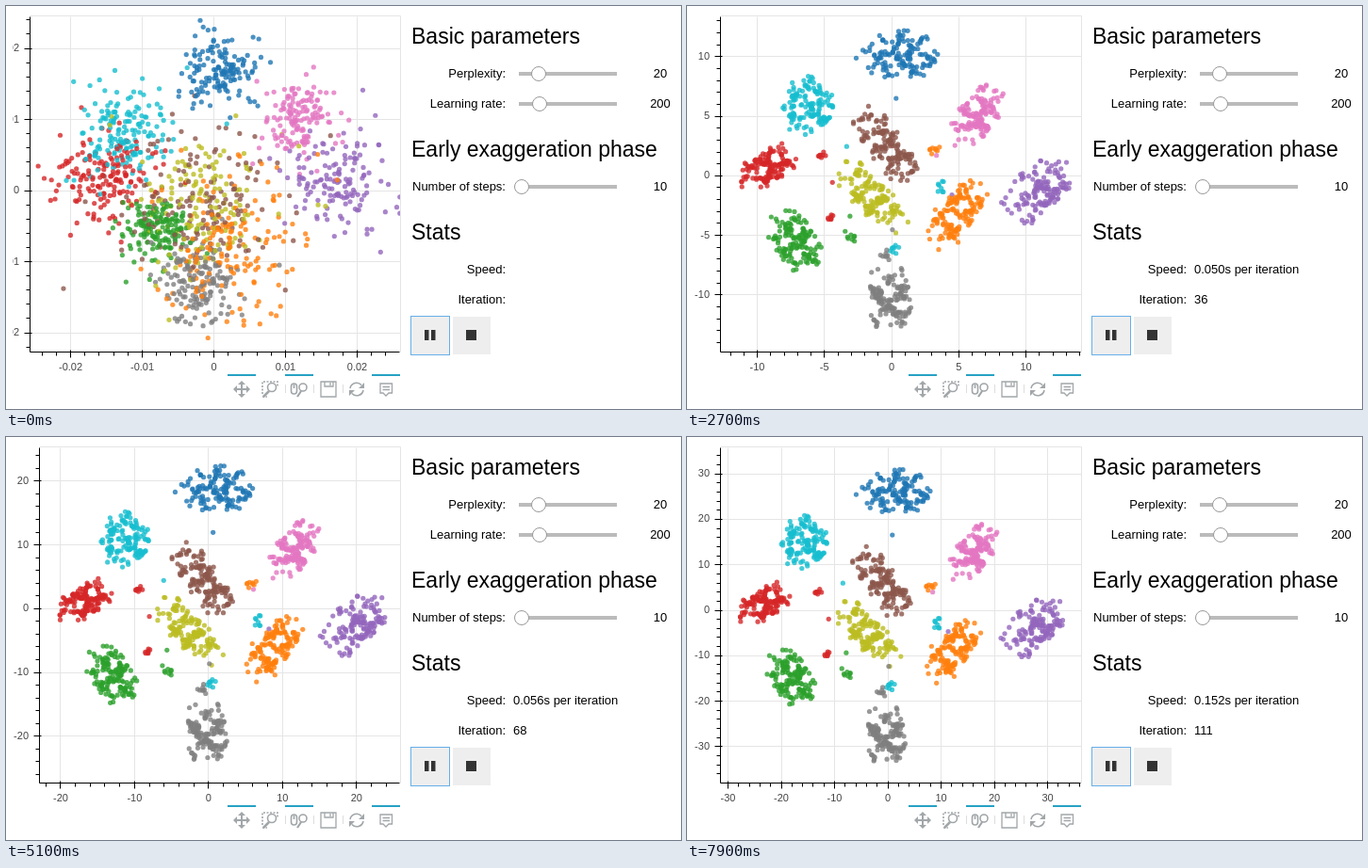
Recreate the animation shown at these times as an HTML page with a canvas. Size 716 px wide and 428 px high, loop 8 s.

```html
<!DOCTYPE html>
<html lang="en">
<head>
<meta charset="utf-8">
<title>t-SNE embedding</title>
<style>
html, body { margin: 0; width: 716px; height: 428px; overflow: hidden; background: #fff; }
canvas, svg { position: absolute; left: 0; top: 0; }
text { font: 13px "Liberation Sans", Arial, sans-serif; fill: #000; }
.head { font-size: 23px; }
.end { text-anchor: end; }
.mid { text-anchor: middle; }
.icon { fill: none; stroke: #a1a6a9; stroke-width: 1.6; }
.icon .solid { fill: #a1a6a9; stroke: none; }
</style>
</head>
<body>
<canvas id="plot" width="716" height="428"></canvas>
<svg width="716" height="428">
  <text class="head" x="430" y="40">Basic parameters</text>
  <text class="head" x="430" y="160">Early exaggeration phase</text>
  <text class="head" x="430" y="248">Stats</text>
  <g class="end">
    <text x="530" y="76">Perplexity:</text>
    <text x="530" y="108">Learning rate:</text>
    <text x="530" y="196">Number of steps:</text>
    <text x="530" y="284">Speed:</text>
    <text x="530" y="316">Iteration:</text>
  </g>
  <g class="mid">
    <text x="694" y="76">20</text>
    <text x="694" y="108">200</text>
    <text x="694" y="196">10</text>
  </g>
  <text id="speed" x="538" y="284"></text>
  <text id="iter" x="538" y="316"></text>
  <path d="M544 72H648M544 104H648M544 192H648" stroke="#bbb" stroke-width="4"/>
  <g fill="#fff" stroke="#999">
    <circle cx="565" cy="72" r="7.5"/><circle cx="566" cy="104" r="7.5"/><circle cx="547" cy="192" r="7.5"/>
  </g>
  <rect x="429.5" y="329.5" width="41" height="41" fill="#eee" stroke="#66afe9"/>
  <rect x="474" y="330" width="40" height="40" fill="#eee"/>
  <path d="M444 344h4.5v11h-4.5zM451 344h4.5v11h-4.5zM488 344h11v11h-11z" fill="#333"/>

  <path d="M235 392H265M296 392H326M388 392H418" stroke="#26a2c4" stroke-width="2"/>
  <path d="M296.5 402v9M326.5 402v9M357.5 402v9" stroke="#ddd"/>
  <g class="icon">
    <path d="M243 407H257M250 400V414" stroke-width="2"/>
    <path class="solid" d="M241 407l4-4v8zM259 407l-4-4v8zM250 398l-4 4h8zM250 416l-4-4h8z"/>
    <path d="M272 412V399H288V404M272 415H277" stroke-dasharray="2 1.5"/>
    <circle cx="282" cy="405" r="4.5"/><path d="M279 409L273 415" stroke-width="2.5"/>
    <rect x="302.5" y="401" width="6" height="11" rx="3"/><path d="M305.5 402v4"/>
    <circle cx="315" cy="405" r="4"/><path d="M313 409L309 415" stroke-width="2.2"/>
    <path d="M334 399H350V415H334zM338 399V404H347V399M344 400v3" stroke-width="1.3"/>
    <path d="M365 406A7 7 0 0 1 377 402.5M379 408A7 7 0 0 1 367 411.5"/>
    <path class="solid" d="M380 400v6h-6zM364 414v-6h6z"/>
    <path d="M397 401H409.5V411H406L403 414L400 411H397zM399.5 404.5H407M399.5 407.5H407" stroke-width="1.3"/>
  </g>
</svg>
<script>
const ctx = document.getElementById('plot').getContext('2d');
const speedText = document.getElementById('speed'), iterText = document.getElementById('iter');
const TOP = 11, RIGHT = 418, BOTTOM = 367;

let seed = 7;
function rnd() {
  seed = seed + 0x6D2B79F5 | 0;
  let t = Math.imul(seed ^ seed >>> 15, 1 | seed);
  t = t + Math.imul(t ^ t >>> 7, 61 | t) ^ t;
  return ((t ^ t >>> 14) >>> 0) / 4294967296;
}
const gauss = () => (rnd() + rnd() + rnd() + rnd() - 2) * 1.73;
const lerp = (a, b, p) => a + (b - a) * p;
const bend = (p, c) => p + c * p * (1 - p);
const around = (x, y, sx, sy = sx) => [x + gauss() * sx, y + gauss() * sy];

const points = [];

// start: initial centre and spread; limb: axis and radius of the final shape;
// satellites: centres of small detached groups
function cluster(color, [startX, startY, spread], [x1, y1, x2, y2, r], ...satellites) {
  const midX = (x1 + x2) / 2, midY = (y1 + y2) / 2;
  const phaseX = rnd() * 6, phaseY = rnd() * 6;

  function add(cx, cy, dx, dy) {
    const wide = rnd() < .15 ? 2 : .9;
    const angle = rnd() * 7, far = 60 + 130 * rnd();
    points.push({
      color, key: rnd(),
      stages: [
        around(startX, startY, spread * wide ** .6),
        rnd() < .018
          ? [212 + far * Math.cos(angle), 190 + far * Math.sin(angle)]
          : around(lerp(212, midX, .3), lerp(236, midY + 36, .3), 9 * wide, 7 * wide),
        [cx + dx * 1.1 + 4, cy + dy * 1.1 - 6],
        [cx + dx, cy + dy]
      ]
    });
  }

  for (let n = 0; n < 145;) {
    const u = rnd() - .5, angle = rnd() * 7, d = r * Math.sqrt(rnd());
    const dx = (x2 - x1) * u + d * Math.cos(angle), dy = (y2 - y1) * u + d * Math.sin(angle);
    // leave small holes so that the points form strands
    if (Math.sin(dx / 4 + phaseX) * Math.sin(dy / 4 + phaseY) < -.25) continue;
    add(midX, midY, dx, dy);
    n++;
  }
  for (const [x, y] of satellites)
    for (let i = 0; i < 8; i++) add(x, y, ...around(0, 0, 3));
  const p = .3 + .4 * rnd();
  add(lerp(midX, 215, p), lerp(midY, 210, p), 0, 0);
}

cluster('#1f77b4', [227, 70, 19], [200, 61, 238, 56, 23]);
cluster('#ff7f0e', [240, 255, 39], [297, 207, 267, 250, 17], [258, 160]);
cluster('#2ca02c', [160, 237, 18], [99, 238, 119, 270, 20], [169, 253]);
cluster('#d62728', [102, 185, 25], [64, 187, 102, 165, 16], [140, 165], [151, 231]);
cluster('#9467bd', [352, 188, 29], [382, 188, 351, 215, 22]);
cluster('#8c564b', [205, 205, 40], [189, 130, 226, 182, 18]);
cluster('#e377c2', [313, 120, 20], [316, 106, 291, 138, 18]);
cluster('#7f7f7f', [205, 292, 20], [210, 302, 213, 335, 20], [205, 271]);
cluster('#bcbd22', [212, 215, 33], [171, 190, 211, 229, 18]);
cluster('#17becf', [125, 134, 25], [128, 103, 122, 118, 24], [266, 197], [215, 265]);
points.sort((a, b) => a.key - b.key);

// p0 is the stage's tick, units are pixels per data unit
const KEYS = [
  { tick: 0, iter: 0, unit: [7600, 7550], origin: [220.5, 196] },
  { tick: 11, iter: 13, unit: [76.25, 73.6], origin: [211.5, 236] },
  { tick: 27, iter: 36, unit: [14.25, 12.65], origin: [217, 180.3] },
  { tick: 79, iter: 111, unit: [5.65, 4.83], origin: [213, 184] }
];

function view(tick) {
  const stage = tick < 11 ? 0 : tick < 27 ? 1 : 2;
  const a = KEYS[stage], b = KEYS[stage + 1];
  const p = (tick - a.tick) / (b.tick - a.tick), eased = bend(p, .3);
  // the visible range grows exponentially at first, then steadily
  const scale = i => stage < 2
    ? a.unit[i] * (b.unit[i] / a.unit[i]) ** eased
    : 1 / lerp(1 / a.unit[i], 1 / b.unit[i], eased);
  const origin = i => lerp(a.origin[i], b.origin[i], eased);
  return {
    stage, eased, kx: scale(0), ky: scale(1), ox: origin(0), oy: origin(1),
    iter: Math.round(lerp(a.iter, b.iter, bend(p, -.12))),
    speed: .05 + .102 * (tick / 79) ** 6.5
  };
}

function ticks(lo, hi) {
  const range = hi - lo, base = 10 ** Math.floor(Math.log10(range / 6));
  const miss = s => Math.abs(6 - range / s);
  const step = [1, 2, 5, 10].map(m => m * base).reduce((a, b) => miss(b) < miss(a) ? b : a);
  const list = [];
  for (let i = Math.ceil(lo / step * 5); i <= hi / step * 5; i++)
    list.push({ v: i * step / 5, major: i % 5 === 0, label: String(+(i * step / 5).toFixed(5)) });
  return list;
}

function line(x1, y1, x2, y2, color) {
  const snap = v => Math.floor(v) + .5;
  ctx.strokeStyle = color;
  ctx.beginPath();
  ctx.moveTo(snap(x1), snap(y1));
  ctx.lineTo(snap(x2), snap(y2));
  ctx.stroke();
}

function clip(x, y, w, h) {
  ctx.save();
  ctx.beginPath();
  ctx.rect(x, y, w, h);
  ctx.clip();
}

function draw(tick) {
  const { stage, eased, kx, ky, ox, oy, iter, speed } = view(tick);
  speedText.textContent = tick ? speed.toFixed(3) + 's per iteration' : '';
  iterText.textContent = tick ? iter : '';

  ctx.clearRect(0, 0, 716, 428);
  ctx.font = '11px "Liberation Sans", Arial, sans-serif';
  ctx.textBaseline = 'middle';
  ctx.lineWidth = 1;
  const yTicks = ticks((oy - BOTTOM) / ky, (oy - TOP) / ky);
  const widest = Math.max(...yTicks.filter(t => t.major).map(t => ctx.measureText(t.label).width));
  const left = tick < 2 ? 25 : Math.round(18.65 + widest);
  const xTicks = ticks((left - ox) / kx, (RIGHT - ox) / kx);
  const X = v => ox + v * kx, Y = v => oy - v * ky;

  const grid = '#e5e5e5';
  xTicks.forEach(t => t.major && line(X(t.v), TOP, X(t.v), BOTTOM, grid));
  yTicks.forEach(t => t.major && line(left, Y(t.v), RIGHT, Y(t.v), grid));
  line(left, TOP - 1, RIGHT, TOP - 1, grid);
  line(RIGHT, TOP - 1, RIGHT, BOTTOM, grid);

  clip(left, TOP, RIGHT - left, BOTTOM - TOP);
  ctx.globalAlpha = .8;
  for (const { color, stages } of points) {
    const [x, y] = stages[stage].map((v, i) => lerp(v, stages[stage + 1][i], eased));
    ctx.fillStyle = color;
    ctx.beginPath();
    ctx.arc(x, y, 2.6, 0, 7);
    ctx.fill();
  }
  ctx.restore();

  line(left, TOP, left, BOTTOM, '#000');
  line(left, BOTTOM, RIGHT - 1, BOTTOM, '#000');
  clip(7, 0, 420, 428);
  ctx.fillStyle = '#444';
  ctx.textAlign = 'center';
  for (const { v, major, label } of xTicks) {
    line(X(v), BOTTOM - (major ? 2 : 0), X(v), BOTTOM + (major ? 6 : 4), '#000');
    if (major) ctx.fillText(label, X(v), 384);
  }
  ctx.textAlign = 'right';
  for (const { v, major, label } of yTicks) {
    line(left - (major ? 6 : 4), Y(v), left + (major ? 2 : 0), Y(v), '#000');
    if (major) ctx.fillText(label, left - 11, Y(v));
  }
  ctx.restore();
}

const start = performance.now();
let shown = -1;
function frame() {
  const tick = Math.floor((performance.now() - start) % 8000 / 100);
  if (tick !== shown) draw(shown = tick);
  requestAnimationFrame(frame);
}
frame();
</script>
</body>
</html>
```
